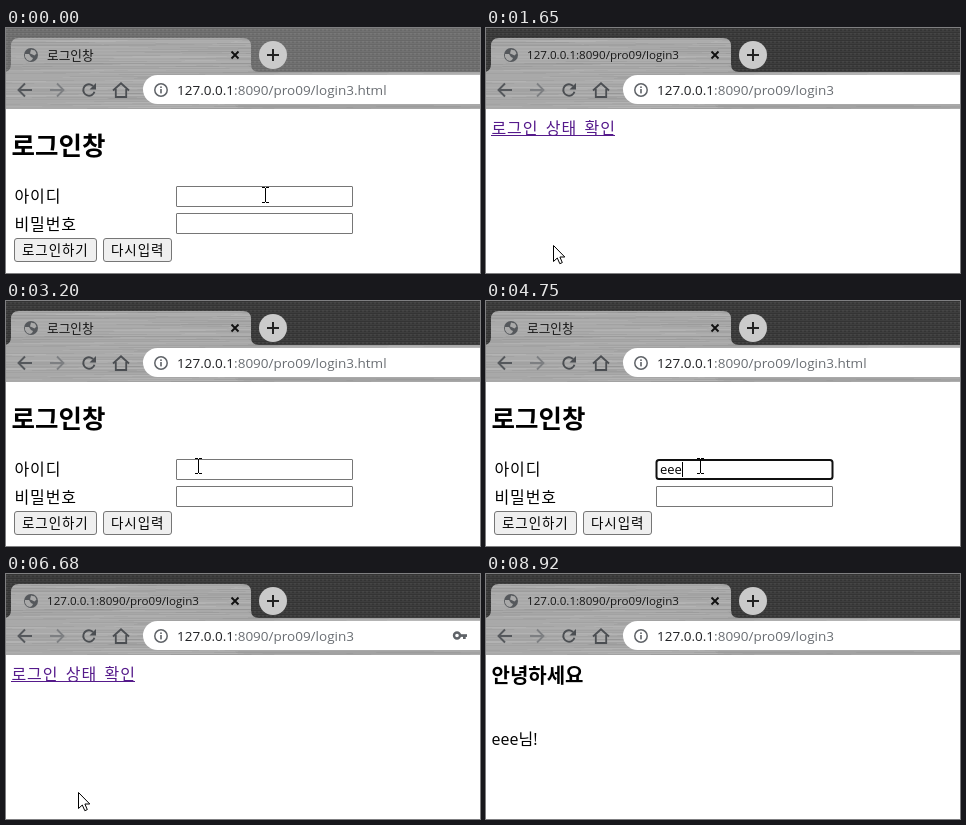
An HTML page with a canvas that plays this animation: 474x245 px, repeating every 9260 ms.

```html
<!DOCTYPE html>
<html lang="ko">
<head>
<meta charset="utf-8">
<title>로그인창</title>
<style>
html, body { margin: 0; width: 100%; height: 100%; overflow: hidden; background: #fff; }
canvas { display: block; width: 474px; height: 245px; }
</style>
</head>
<body>
<canvas id="stage" width="474" height="245"></canvas>
<script>
const W = 474, H = 245, LOOP = 9260, STEP = 66.7;
const g = document.getElementById('stage').getContext('2d');
const LATIN = '"Open Sans", "Noto Sans CJK KR", "Noto Sans CJK", sans-serif';
const HANGUL = '"Noto Sans CJK KR", "Noto Sans CJK", sans-serif';
const USER = 'eee';

// Pointer hotspot: time, x, y
const PATH = [
  [0, 259, 167], [70, 250, 169], [450, 150, 195], [970, 67, 217],
  [1670, 67, 217], [1800, 98, 185], [1990, 132, 122], [2130, 122, 99],
  [2990, 122, 99], [3200, 192, 165], [3460, 212, 166], [3680, 214, 165],
  [5950, 214, 165], [6200, 150, 190], [6480, 72, 218],
  [6880, 72, 218], [7150, 78, 165], [7400, 88, 100],
  [7690, 88, 100], [7820, 86, 114], [8000, 50, 150], [8150, 12, 172],
  [8350, 50, 178], [8550, 110, 228], [8700, 160, 230], [8780, 183, 216], [8850, 232, 232]
];

function pointer(time) {
  const t = Math.floor((time + 20) / STEP) * STEP;
  for (let i = 1; i < PATH.length; i++) {
    const [t0, x0, y0] = PATH[i - 1], [t1, x1, y1] = PATH[i];
    if (t < t1) {
      const k = Math.max(0, (t - t0) / (t1 - t0));
      return [Math.round(x0 + (x1 - x0) * k), Math.round(y0 + (y1 - y0) * k)];
    }
  }
  return PATH[PATH.length - 1].slice(1);
}

function between(t, a, b) { return t >= a && t < b; }
function inside([x, y], l, t, r, b) { return x >= l && x <= r && y >= t && y <= b; }

function text(c, str, x, y, font, color) {
  c.font = font;
  c.fillStyle = color || '#000';
  c.fillText(str, x, y);
}

// Body Hangul is set slightly open
function label(str, x, y, size, color) {
  g.letterSpacing = '0.9px';
  text(g, str, x, y, size + 'px ' + HANGUL, color);
  const width = g.measureText(str).width;
  g.letterSpacing = '0px';
  return width;
}

function box(x, y, w, h, r, fill, stroke, line) {
  g.beginPath();
  g.roundRect(x + line / 2, y + line / 2, w - line, h - line, r);
  g.fillStyle = fill;
  g.fill();
  g.strokeStyle = stroke;
  g.lineWidth = line;
  g.stroke();
}

function strokePath(c, d, color, width) {
  c.strokeStyle = color;
  c.lineWidth = width;
  c.stroke(new Path2D(d));
}

function brushed(c, x, y, w, h) {
  let seed = 7;
  const rnd = () => (seed = (seed * 16807) % 2147483647) / 2147483647;
  c.fillStyle = '#a9a9a9';
  c.fillRect(x, y, w, h);
  for (let row = y; row < y + h; row++) {
    for (let i = 0; i < 4; i++) {
      c.fillStyle = rnd() < 0.5 ? 'rgba(255,255,255,.06)' : 'rgba(0,0,0,.04)';
      c.fillRect(x + rnd() * w - 90, row, 80 + rnd() * 200, 1);
    }
  }
}

function weave(c, base, dark, light) {
  const tile = document.createElement('canvas');
  tile.width = 4;
  tile.height = 4;
  const p = tile.getContext('2d');
  p.fillStyle = base;
  p.fillRect(0, 0, 4, 4);
  p.fillStyle = dark;
  p.fillRect(0, 0, 4, 1);
  p.fillRect(2, 2, 2, 1);
  p.fillStyle = light;
  p.fillRect(0, 1, 2, 1);
  c.fillStyle = c.createPattern(tile, 'repeat');
  c.fillRect(0, 0, W, 46);
}

// Browser frame, drawn once per window state
function makeFrame(active) {
  const cv = document.createElement('canvas');
  cv.width = W;
  cv.height = 81;
  const c = cv.getContext('2d');
  if (active) weave(c, '#3e3e3e', '#343434', '#464646');
  else weave(c, '#717171', '#686868', '#797979');

  c.save();
  c.clip(new Path2D('M-3 44Q5 44 5 36V18Q5 10 13 10H237Q245 10 245 18V36Q245 44 253 44H474V81H0Z'));
  brushed(c, 0, 10, W, 71);
  c.restore();

  // favicon
  c.fillStyle = '#55585c';
  c.beginPath();
  c.arc(25, 27, 7, 0, 7);
  c.fill();
  c.fillStyle = '#a9a9a9';
  c.fill(new Path2D('M19 26l4 0 2 3 2 1-1 2-2 1-3-1-2-3zM25 21.5l4 1 1.5 3-2 2-2-1-2.5-1z'));

  strokePath(c, 'M225.5 23.5l7 7m0-7l-7 7', '#111', 1.9);
  c.fillStyle = '#cacaca';
  c.beginPath();
  c.arc(267, 27, 14, 0, 7);
  c.fill();
  strokePath(c, 'M261 27h12M267 21v12', '#222', 2);

  const ink = '#4b4e52';
  strokePath(c, 'M26 62H13.5M19 55.5L12.5 62l6.5 6.5', '#55585c', 1.9);
  strokePath(c, 'M44 62h12.5M51 55.5l6.5 6.5-6.5 6.5', '#7d7f82', 1.8);
  c.beginPath();
  c.arc(83, 62, 5.7, 0.3, 5.5);
  c.strokeStyle = ink;
  c.lineWidth = 1.9;
  c.stroke();
  c.fillStyle = ink;
  c.fill(new Path2D('M90 55v6.5h-6.5z'));
  strokePath(c, 'M107 62.5l8-7.2 8 7.2M109.8 61v8h10.4v-8', ink, 1.8);

  c.fillStyle = '#fff';
  c.beginPath();
  c.roundRect(137, 47, 380, 29, 14.5);
  c.fill();
  c.beginPath();
  c.arc(155, 62, 6.2, 0, 7);
  c.strokeStyle = '#5f6368';
  c.lineWidth = 1.5;
  c.stroke();
  c.fillStyle = '#5f6368';
  c.fillRect(154.2, 61, 1.6, 4.4);
  c.fillRect(154.2, 58.4, 1.6, 1.6);
  return cv;
}
const frames = { active: makeFrame(true), idle: makeFrame(false) };

function pageAt(t) {
  if (t < 1250 || between(t, 2660, 6680)) return 'login';
  return t < 7550 ? 'link' : 'hello';
}

function drawBars(t, page) {
  g.drawImage(t < 70 ? frames.idle : frames.active, 0, 0);
  const login = page === 'login';
  if (login) text(g, '로그인창', 41, 31.5, '500 12.7px ' + HANGUL, '#161616');
  else text(g, '127.0.0.1:8090/pro09/login3', 41, 31, '11.6px ' + LATIN, '#161616');

  const host = '127.0.0.1';
  text(g, host, 171, 67, '13.5px ' + LATIN, '#202124');
  const x = 171 + g.measureText(host).width;
  text(g, ':8090/pro09/login3' + (login ? '.html' : ''), x, 67, '13.5px ' + LATIN, '#6a6e73');

  if (between(t, 5260, 7550)) {
    g.beginPath();
    g.arc(451, 61.5, 3, 0, 7);
    g.strokeStyle = '#5f6368';
    g.lineWidth = 2.4;
    g.stroke();
    g.fillStyle = '#5f6368';
    g.fillRect(454, 60.2, 7, 2.7);
    g.fillRect(457, 62, 2.7, 3);
  }
}

function button(str, x, w, hot, down) {
  const fill = down ? '#f5f5f5' : hot ? '#e5e5e5' : '#efefef';
  const edge = down ? '#8d8d8d' : hot ? '#4f4f4f' : '#767676';
  box(x, 210, w, 24, 2.5, fill, edge, 1);
  label(str, x + 8, 227, 13.5);
}

function field(y, focused) {
  if (focused) box(169.5, y, 178, 21, 2.5, '#fff', '#101010', 2);
  else box(170, y, 177, 21, 0.5, '#fff', '#767676', 1);
}

function caret(x, y) {
  g.fillStyle = '#000';
  g.fillRect(Math.round(x), y, 1, 15);
}

function count(t, times) { return times.filter(v => t >= v).length; }

function drawLogin(t, pos) {
  text(g, '로그인창', 5.5, 126.5, 'bold 25.5px ' + HANGUL);
  label('아이디', 8.5, 174, 16);
  label('비밀번호', 8.5, 201.5, 16);

  const idFocus = between(t, 3460, 5020), pwFocus = between(t, 5020, 6480);
  field(158, idFocus);
  field(185, pwFocus);

  if (t > 2660) {
    const typed = USER.slice(0, count(t, [4340, 4550, 4750]));
    text(g, typed, 174, 173, '13px ' + LATIN);
    if (idFocus && !between(t, 3950, 4210)) caret(174 + g.measureText(typed).width, 161);

    const dots = '•'.repeat(count(t, [5260, 5460, 5680]));
    text(g, dots, 174, 200, '13.33px "Liberation Sans", sans-serif');
    if (pwFocus && t < 6180) caret(174 + g.measureText(dots).width, 188);
  }

  const down = between(t, 1040, 1110) || between(t, 6480, 6550);
  button('로그인하기', 8, 83, inside(pos, 8, 210, 91, 234), down);
  button('다시입력', 97, 69, inside(pos, 97, 210, 166, 234), false);
}

function drawLink() {
  g.wordSpacing = '3px';
  const width = label('로그인 상태 확인', 5.5, 106, 16, '#551a8b');
  g.wordSpacing = '0px';
  g.fillRect(5, 107, Math.round(width), 1);
}

function drawHello() {
  text(g, '안녕하세요', 5.5, 108.5, 'bold 20px ' + HANGUL);
  text(g, USER + '님!', 5.5, 171, '16px ' + LATIN);
}

const ARROW = new Path2D('M.5 .5V16.5L4.3 13 6.8 18.7 9.3 17.6 6.9 12H11.8Z');
const HAND = new Path2D('M-2 1.5Q0-1 2 1.5V8Q4 6.5 5.5 8.5 7.5 7.5 8.5 9.5 11 9 11 11.5V16L8.5 20V23.5H-1.5V20L-6 13Q-7 10.5-4.5 10.5L-2 13Z');

function cursorKind(t, page, pos) {
  if (between(t, 7550, 7690)) return 'hand';
  if (page === 'link') return inside(pos, 5, 91, 129, 109) ? 'hand' : 'arrow';
  if (page === 'hello') {
    return inside(pos, 5, 90, 98, 112) || inside(pos, 5, 156, 51, 176) ? 'beam' : 'arrow';
  }
  return inside(pos, 170, 158, 347, 179) || inside(pos, 170, 185, 347, 206) ? 'beam' : 'arrow';
}

function drawCursor(kind, [x, y]) {
  g.save();
  g.translate(x, y);
  if (kind === 'beam') {
    g.fillStyle = '#000';
    g.fillRect(0, -7, 1, 14);
    for (const top of [-8, 7]) {
      g.fillRect(-3, top, 3, 1);
      g.fillRect(1, top, 3, 1);
    }
  } else {
    const shape = kind === 'hand' ? HAND : ARROW;
    g.fillStyle = '#fff';
    g.fill(shape);
    g.strokeStyle = '#000';
    g.lineWidth = 1;
    g.stroke(shape);
    if (kind === 'hand') strokePath(g, 'M2 7v4M5.3 8.5v3M8.3 9.5v3', '#000', 1);
  }
  g.restore();
}

function draw(t) {
  const page = pageAt(t), pos = pointer(t);
  g.fillStyle = '#fff';
  g.fillRect(0, 0, W, H);
  drawBars(t, page);
  if (page === 'login') drawLogin(t, pos);
  else if (page === 'link') drawLink();
  else drawHello();
  if (t < 8920) drawCursor(cursorKind(t, page, pos), pos);
}

const start = performance.now();
function tick() {
  draw((performance.now() - start) % LOOP);
  requestAnimationFrame(tick);
}
tick();
</script>
</body>
</html>
```
